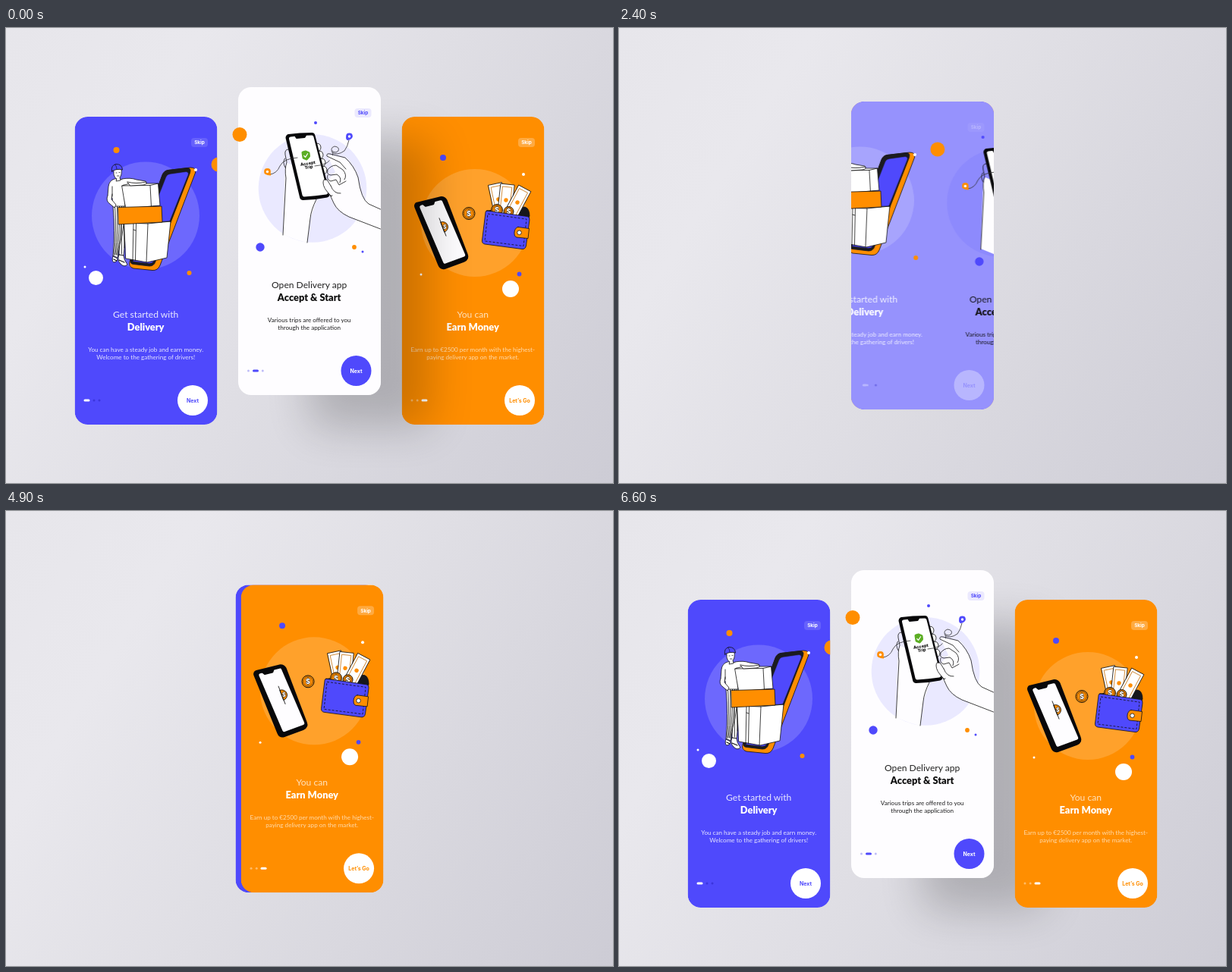
Write an HTML page that moves like this. It is 800x600 px and loops after 6700 ms.

```html
<!DOCTYPE html>
<html lang="en">
<head>
<meta charset="utf-8">
<title>Delivery onboarding</title>
<style>
html, body { margin: 0; width: 100%; height: 100%; overflow: hidden; }
body { position: relative; background: linear-gradient(122deg, #e7e6eb 0%, #e9e8ed 22%, #dfdee4 52%, #cdccd5 100%); }
.card { position: absolute; left: 0; top: 0; width: 187.5px; height: 406px; }
.face { position: absolute; inset: 0; border-radius: 17px; }
.clip { overflow: hidden; border-radius: 17px; }
.shade { position: absolute; inset: 0; border-radius: 17px; box-shadow: 80px 56px 56px -14px rgba(0, 0, 0, .2); }
svg { position: absolute; left: 0; top: 0; overflow: visible; }
.head { font: 400 12.1px Lato, sans-serif; }
.bold { font: 900 12.8px Lato, sans-serif; }
.body { font: 400 8.1px Lato, sans-serif; }
.ui { font: 700 7px Inter, sans-serif; }
.skip { font: 700 6.4px Inter, sans-serif; }
text { text-anchor: middle; }
</style>
</head>
<body>
<script>
const LOOP = 6700, W = 187.5;
const BLUE = '#4f49fc', ORANGE = '#ff8e00', WHITE = '#fefdff', INK = '#111';

// --- drawing helpers ---
const dot = (x, y, r, fill, more = '') => `<circle cx="${x}" cy="${y}" r="${r}" fill="${fill}" ${more}/>`;
const shape = (d, fill = 'none', stroke = INK, w = .8) =>
  `<path d="${d}" fill="${fill}" stroke="${stroke}" stroke-width="${w}" stroke-linejoin="round" stroke-linecap="round"/>`;
const blob = (d, fill, w) => shape(d, fill, fill, w);
const label = (x, y, cls, fill, s, more = '') => `<text x="${x}" y="${y}" class="${cls}" fill="${fill}" ${more}>${s}</text>`;
const from = (x, y, s) => `<g transform="translate(${-x} ${-y})">${s}</g>`;
// a part that slides k times as far as its page during a swipe
const drift = (k, s) => `<g class="drift" data-k="${k}">${s}</g>`;
const dollar = (x, y, size) =>
  `<text x="${x}" y="${y}" fill="#fff" stroke="${INK}" stroke-width=".8" style="font:800 ${size}px Inter,sans-serif;paint-order:stroke">$</text>`;
const coin = (x, y, r) => dot(x, y, r, ORANGE, `stroke="${INK}" stroke-width="1"`) +
  dot(x, y, r - 1.8, 'none', `stroke="${INK}" stroke-width=".5"`) + dollar(x, y + 3.2, 9);
const pin = (x, y, fill, side) =>
  blob(`M${x - 3.6} ${y}Q${x - 3.6} ${y - 3.6} ${x} ${y - 3.6}Q${x + 3.6} ${y - 3.6} ${x + 3.6} ${y}Q${x + 3} ${y + 3} ${x + side} ${y + 4.2}Q${x - 4} ${y + 3.6} ${x - 3.6} ${y}Z`, fill, 1.6) +
  dot(x, y, 1.7, '#fff');

// --- illustrations ---
const man =
  // trousers and shoes
  shape('M149 233L158 234Q158 262 157 280L155 300 149 299Q150 262 146 240Z', '#fff') +
  shape('M141 234L155 234Q157 262 150 285L147 303 141 300Q144 268 141 234Z', '#fff') +
  [0, 1, 2, 3].map(i => shape(`M${143.5 + i * 3} 235Q${146 + i * 2.4} 265 ${142.5 + i * 1.5} 299`, 'none', INK, .8)).join('') +
  shape('M155 240L156 290M152 258L152.5 298', 'none', INK, .8) +
  shape('M141 301L147 304Q147 308 142 309 139 307 141 301Z', '#fff') +
  shape('M149 299L155 300Q155 305 160 312 156 316 151 311 146 306 149 299Z', '#fff') +
  shape('M149 306L156 309M142 305L146 307', 'none', INK, 1.2) +
  // shirt, arms
  shape('M143 199Q136 201 135 209L134 221 140 224 141 235H157L157 203Q154 199 150 199Z', '#fff') +
  shape('M134 221Q131 228 137 232L143 237 145 233 139 226 140 219', '#fff') +
  shape('M153 199Q164 197 172 200L184 202Q187 205 182 206L160 208 155 207', '#fff') +
  shape('M140 209L140 222', 'none') +
  // head
  shape('M142 187L142 193Q143 198 146 199L145 202 151 201 150 197Q153 194 152 186Z', '#fff') +
  shape('M145 191H146M149 190.5H150M146.5 195H149', 'none', INK, .7) +
  shape('M139.5 189Q138 181 145 179.5 153 179.5 153.5 187 146 185 139.5 189Z', BLUE) +
  shape('M144 180Q146 183 146 186', 'none', INK, .6);

const bigPhone =
  shape('M206 194Q208 188 214 187.5L243 184Q251.5 184 249.5 191L203 313Q200 320 193 319.5L168 317Q161 315 163 308Z', ORANGE) +
  blob('M204.5 198Q207 188.5 213 187.5L239 184.5Q244.5 184.5 242.5 191L197 308Q195 314 189 314L168 311.5Q163 311 164 306Z', '#1b1b20', .8) +
  blob('M211.5 196Q212.5 193.5 216 193L237 190Q241 190 239.5 194L195 306Q193.5 310 189 310L168 307.5Z', BLUE, .5);

const boxes =
  shape('M156 257L217 255 212 303 186 309 158 304Z', '#fff') +
  shape('M156 257L187 258 185 309M187 258L217 255M168 257.5L167 306M171.5 257.5L170.5 306.5M168 266L171 267') +
  shape('M153 208L163 205 200.500 205 203 234 158 238Z', '#fff') +
  shape('M153 208L190 207.5 191.5 236M190 207.5L200.5 205') +
  shape('M148 236.5L205 235 206 256 148.5 259Z', ORANGE);

const art1 = from(90.5, 117,
  drift(1.08, dot(184, 247.5, 71, '#fff', 'fill-opacity=".17"')) + bigPhone + man + boxes +
  shape('M160 203Q172 206 184 203 187 206 181 207L164 208Z', '#fff') +
  dot(145.5, 161, 4, ORANGE) + dot(250, 187, 2, '#fff') + dot(104, 315, 1.5, '#fff') +
  dot(118.5, 329.5, 9.5, '#fff') + drift(.87, dot(241.5, 323, 3, ORANGE)) + dot(280, 180, 9.5, ORANGE));

const art2 = from(306, 78,
  drift(.89, dot(404, 211.5, 71.3, BLUE, 'fill-opacity=".11"')) +
  // holding hand
  blob('M371 178Q368 182 368 192L365 272 382 279 397 283 401 251 410 224 400 190Z', '#fefdff', .1) +
  shape('M372 160Q367 160 368 167L370 177Q367 186 369 198L365 273M409 226Q402 240 401 251L397 283') +
  shape('M367.5 172Q364 177 368 184') +
  [[411, 157], [414, 167], [417, 177], [419, 187]].map(([x, y]) =>
    shape(`M${x - 5} ${y - 4}Q${x + 3} ${y - 7} ${x + 4} ${y} ${x + 4} ${y + 6} ${x - 2} ${y + 6}Z`, '#fff')).join('') +
  // phone
  blob('M373 144.5Q387 142.5 403 142.5L422.5 219Q408 222 391.500 222.5Z', '#08080a', 9) +
  blob('M375.5 146Q388 144 403 144L421.5 217Q408 219 393 220Z', '#fff', 5) +
  blob('M381.5 142.5L395 141.5 393.5 144 383 145Z', '#08080a', 2) +
  blob('M391.5 164.5L395 163.5 398.5 165 399 169 396 172.5 392.500 171Z', '#5cae24', 4) +
  shape('M392.8 168.5L394.6 170.4 397.5 165.7', 'none', '#fff', 1.2) +
  `<g transform="rotate(-9 398 180)" style="font:800 5.6px Inter,sans-serif" fill="${INK}"><text x="398" y="180.5">Accept</text><text x="398.5" y="185.5">Trip</text></g>` +
  // route
  shape('M348 193Q357 192 361 182 366 172 384 171M407 182Q428 181 431 166 426 158 433 156 440 157 438 162 434 166 430 162M430 164Q436 169 446 162 450 157 452 148', 'none', '#333', .8) +
  pin(344.5, 189.5, ORANGE, 4) + pin(452.5, 143, BLUE, -2) +
  // tapping hand
  blob('M423 167L447 171Q459 182 464 197 468 226 478 232L493.5 239V265L452 249Q437 242 432 231L418 205Q418 199 424 201L434 190Z', '#fefdff', .1) +
  shape('M493.5 239L478 232Q468 226 464 197 459 182 447 171L427 166Q422 165 423 169L440 177 448 186M493.5 265L452 249Q437 242 432 231L427 220Q418 211 418 204 418 198 423 200L428 208') +
  shape('M423 188Q428 181 435 181L444 187Q450 194 446 200M424 188Q422 193 428 194L436 193Q443 197 440 204M424 194Q422 200 428 202L435 200 439 207 448 202M428 208Q432 219 441 218') +
  shape('M426 219Q428 223 430 221', 'none', INK, 1) +
  drift(.64, dot(408, 125, 2, BLUE)) + drift(1.25, dot(335, 289, 5.7, BLUE)) +
  drift(1.15, dot(459, 289, 2.9, ORANGE)) + drift(1.25, dot(470, 295, 1.5, BLUE)));

const bill = (x, y, turn) => `<g transform="translate(${x} ${y}) rotate(${turn})">` +
  shape('M-9 -21H9V22H-9Z', '#fff') + shape('M-6 -17.500H6V18H-6Z', 'none', '#c97a1c', .8) +
  dot(0, 0, 2.7, ORANGE) + '</g>';

const art3 = from(521.5, 117,
  drift(.9, dot(618, 257, 71, '#fff', 'fill-opacity=".17"')) +
  // phone
  blob('M543 234.5L573.5 227Q576 227 577 229L604 300Q605 302.5 602 304L577.5 313Q575 313.5 574 311Z', '#08080a', 10) +
  blob('M547.5 236L573 229.5 603 299.5 578.5 308.5Z', WHITE, 4.5) +
  blob('M550.5 232.5L564 229 563 232 553 234.5Z', '#08080a', 2.5) +
  `<g transform="rotate(-21 575.5 262.5)">` +
  shape('M575.5 255.5A7 7 0 0 1 575.5 269.5Z', ORANGE) +
  shape('M575.5 250V275') + '</g>' + dollar(578.3, 265, 7) +
  coin(610, 244.5, 8) +
  // wallet
  shape('M634 241L684 236Q690 238 690 248L683 262 636 256Z', '#17171c') +
  bill(649, 226, -12) + bill(659, 227, 6) + bill(674, 230, 28) +
  coin(647, 240, 7.5) + coin(662.5, 242, 6.5) +
  shape('M634 241L687 248.5Q690.5 249 690 253L685.5 287Q684.5 292 680 291.5L631 285Q627 284 627.5 280L632 243Q632 241 634 241Z', BLUE) +
  `<path d="M635 245L686 252 682 287.5 631 281Z" fill="none" stroke="${INK}" stroke-width=".8" stroke-dasharray="3 2"/>` +
  shape('M675 262.5L689.5 264.5 688 277.5 673 276Q669.5 275 670 269 671 263 675 262.5Z', ORANGE) +
  dot(676.5, 269.8, 2.8, '#fff', `stroke="${INK}" stroke-width=".8"`) +
  drift(1.16, dot(576, 171, 4, BLUE)) + dot(682, 193, 2, '#fff') + drift(1.13, dot(547, 325, 1.5, '#fff')) +
  drift(.85, dot(665, 344, 11, '#fff')) + drift(.83, dot(676.5, 324.5, 2.9, BLUE)));

const words = (lines, x, fill, soft, faint) =>
  label(x, 265, 'head', fill, lines[0], `opacity="${soft}"`) + label(x, 282, 'bold', fill, lines[1]) +
  label(x, 309.7, 'body', fill, lines[2], `opacity="${faint}"`) + label(x, 319.7, 'body', fill, lines[3], `opacity="${faint}"`);

const looseDot = dot(2, 62.5, 9.5, ORANGE, 'id="loose"');

const pages = [
  art1 + words(['Get started with', 'Delivery', 'You can have a steady job and earn money.', 'Welcome to the gathering of drivers!'], 93.7, '#fff', .88, .85),
  art2 + words(['Open Delivery app', 'Accept &amp; Start', 'Various trips are offered to you', 'through the application'], 93.7, INK, .92, .95),
  art3 + words(['You can', 'Earn Money', 'Earn up to €2500 per month with the highest-', 'paying delivery app on the market.'], 93.7, '#fff', .75, .68)
];

// --- fixed controls, one look per page ---
const looks = [
  { bg: BLUE, badge: '#6661fc', skip: '#ffffff', pill: '#ffffff', mini: '#3b35dc', pillX: 12, a: 25.5, b: 32.5, round: '#ffffff', word: BLUE, next: 1, go: 0 },
  { bg: WHITE, badge: '#ebe9fe', skip: BLUE, pill: BLUE, mini: '#bebcf8', pillX: 19, a: 13.5, b: 32.3, round: BLUE, word: '#ffffff', next: 1, go: 0 },
  { bg: ORANGE, badge: '#ffaa40', skip: '#ffffff', pill: '#ffffff', mini: '#ffbb66', pillX: 26, a: 13.5, b: 20.7, round: '#ffffff', word: ORANGE, next: 0, go: 1 }
];
const controls = l =>
  `<rect class="k-badge" x="153.5" y="28" width="22" height="12" rx="4" fill="${l.badge}"/>` +
  label(164.5, 36.3, 'skip k-skip', l.skip, 'Skip') +
  `<g class="k-a" style="transform:translateX(${l.a}px)">${dot(0, 374, 1.5, l.mini, 'class="k-mini"')}</g>` +
  `<g class="k-b" style="transform:translateX(${l.b}px)">${dot(0, 374, 1.5, l.mini, 'class="k-mini"')}</g>` +
  `<rect class="k-pill" y="372.5" width="8" height="3" rx="1.5" fill="${l.pill}" style="transform:translateX(${l.pillX}px)"/>` +
  dot(155.5, 374, 20, l.round, 'class="k-round"') +
  label(155.5, 376.5, 'ui k-next', l.word, 'Next', `opacity="${l.next}"`) +
  label(155.5, 376.5, 'ui k-go', l.word, 'Let’s Go', `opacity="${l.go}"`);

const svg = s => `<svg width="${W}" height="406">${s}</svg>`;
function addCard(cls, bg, inner, before = '') {
  const el = document.createElement('div');
  el.className = 'card ' + cls;
  el.innerHTML = `${before}<div class="face" style="background:${bg}"></div>${inner}`;
  document.body.append(el);
  return el;
}

const left = addCard('clip', BLUE, svg(pages[0] + controls(looks[0])));
const mid = addCard('', WHITE, svg(pages[1] + controls(looks[1]) + looseDot), '<div class="shade"></div>');
const right = addCard('clip', ORANGE, svg(pages[2] + controls(looks[2])));
const stage = addCard('clip', BLUE, svg(
  `<g class="strip">${pages.map((s, i) => `<g class="page" transform="translate(${i * W} 0)">${s}</g>`).join('')}</g>` + controls(looks[0])));
stage.style.cssText = 'transform:translate(306px,97px);z-index:10';

// --- motion ---
const GATHER = [700, 1420, 'cubic-bezier(.65,0,.35,1)'];
const SPREAD = [4672, 6172, 'cubic-bezier(.76,0,.24,1)'];
const SWIPE = 'cubic-bezier(.79,0,.3,1)';
const SWIPES = [[1910, 2877], [3400, 4367]];

// steps: [time, value, easing towards the next step]
function play(el, prop, steps) {
  el.animate(steps.map(([t, v, easing = 'linear']) => ({ offset: t / LOOP, [prop]: v, easing })),
    { duration: LOOP, iterations: Infinity });
}
const gather = (el, prop, open, shut) => play(el, prop, [
  [0, open], [GATHER[0], open, GATHER[2]], [GATHER[1], shut],
  [SPREAD[0], shut, SPREAD[2]], [SPREAD[1], open], [LOOP, open]]);
const swipe = (el, prop, [a, b, c]) => play(el, prop, [
  [0, a], [SWIPES[0][0], a, SWIPE], [SWIPES[0][1], b],
  [SWIPES[1][0], b, SWIPE], [SWIPES[1][1], c], [LOOP, c]]);
const toggle = (el, prop, t1, t2, off, on) => play(el, prop, [
  [0, off], [t1, off], [t1, on], [t2, on], [t2, off], [LOOP, off]]);
const swap = (el, t, a, b) => play(el, 'zIndex', [[0, a], [t, a], [t, b], [LOOP, b]]);

const at = (x, y) => `translate(${x}px,${y}px)`;
gather(left, 'transform', at(90.5, 117), at(306, 97));
gather(mid, 'transform', at(306, 78), at(306, 97));
gather(right, 'transform', at(521.5, 117), at(306, 97));
gather(mid.querySelector('.shade'), 'opacity', 1, 0);
swap(left, 3000, 3, 2);
swap(mid, 3000, 2, 1);
swap(right, 3000, 1, 3);
toggle(mid.querySelector('#loose'), 'opacity', 1050, 5350, 1, 0);
toggle(stage, 'opacity', GATHER[1], SPREAD[0], 0, 1);

const part = name => stage.querySelectorAll('.k-' + name);
const each = key => looks.map(l => l[key]);
const slide = xs => xs.map(x => `translateX(${x}px)`);
swipe(stage.querySelector('.face'), 'backgroundColor', each('bg'));
swipe(stage.querySelector('.strip'), 'transform', slide([0, -W, -2 * W]));
stage.querySelectorAll('.page').forEach((page, i) => {
  page.querySelectorAll('.drift').forEach(el =>
    swipe(el, 'transform', slide([0, 1, 2].map(n => (el.dataset.k - 1) * W * (i - n)))));
});
for (const key of ['badge', 'skip', 'pill', 'mini', 'round'])
  part(key).forEach(el => swipe(el, 'fill', each(key)));
for (const key of ['next', 'go']) part(key).forEach(el => {
  swipe(el, 'opacity', each(key));
  swipe(el, 'fill', each('word'));
});
swipe(part('pill')[0], 'transform', slide(each('pillX')));
swipe(part('a')[0], 'transform', slide(each('a')));
swipe(part('b')[0], 'transform', slide(each('b')));
</script>
</body>
</html>
```
